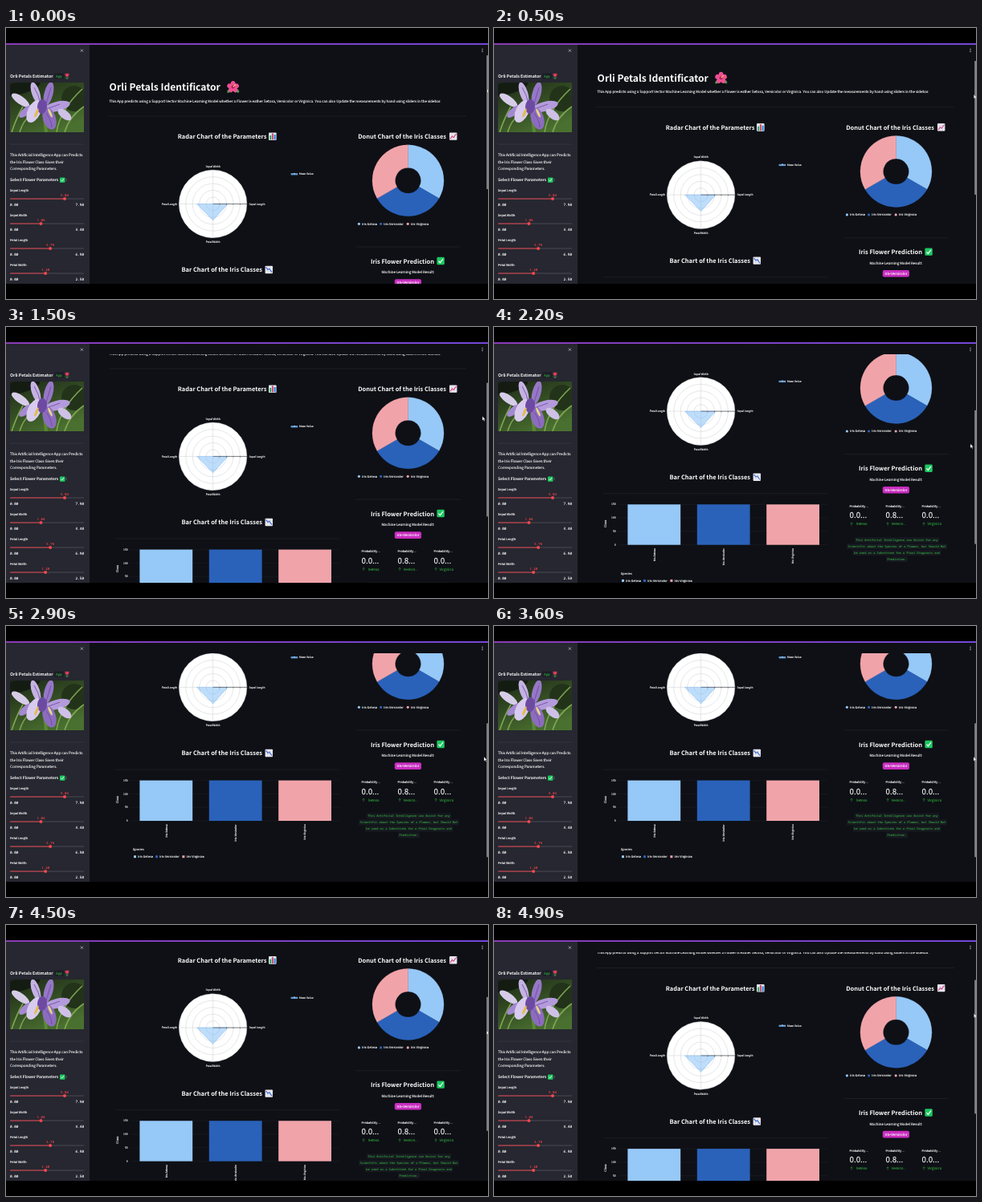
Recreate the animation shown at these times as an HTML page. Size 600x338 px, loop 5 s.

```html
<!DOCTYPE html>
<html lang="en">
<head>
<meta charset="utf-8">
<title>Flower dashboard</title>
<style>
@property --s { syntax: "<number>"; inherits: true; initial-value: 0; }
@property --cx { syntax: "<number>"; inherits: true; initial-value: 599; }
html, body { margin: 0; width: 100%; height: 100%; overflow: hidden; background: #000; }
svg { display: block; width: 600px; height: 338px; animation: scroll 5s infinite; }
text {
  font-family: "Noto Sans CJK JP", "Noto Sans CJK SC", "Noto Sans CJK", Lato, sans-serif;
  color: #fafafa; fill: currentColor; stroke: currentColor; stroke-width: .12;
  white-space: pre; text-rendering: geometricPrecision;
}
.b { font-weight: 700; stroke: none; }
.m { font-family: "Noto Sans Mono", "DejaVu Sans Mono", monospace; }
.red { color: #dc414a; }
.green { color: #2f9a3c; }
.mid { text-anchor: middle; }
.end { text-anchor: end; }
#page { transform: translateY(calc(var(--s) * -1px)); }
#thumb { transform: translateY(calc(var(--s) * .61px)); }
#cursor { transform: translate(calc(var(--cx) * 1px), calc(76px + var(--s) * .61px)); }

/* scroll position, advancing ten times a second */
@keyframes scroll {
  0%   { --s: 0;     --cx: 599; animation-timing-function: steps(3); }
  6%   { --s: 4;     --cx: 598; animation-timing-function: steps(3); }
  12%  { --s: 15;    --cx: 597; animation-timing-function: steps(4); }
  20%  { --s: 32.5;  --cx: 595; animation-timing-function: steps(5); }
  30%  { --s: 58;    --cx: 593; animation-timing-function: steps(7); }
  44%  { --s: 114.3; --cx: 593; animation-timing-function: steps(2); }
  48%  { --s: 126;   --cx: 594; animation-timing-function: steps(5); }
  58%  { --s: 143;   --cx: 595; animation-timing-function: steps(7); }
  72%  { --s: 143;   --cx: 597; animation-timing-function: steps(3); }
  78%  { --s: 134;   --cx: 598; animation-timing-function: steps(3); }
  84%  { --s: 117.5; --cx: 599; animation-timing-function: steps(7); }
  98%, 100% { --s: 56.5; --cx: 597.5; animation-timing-function: steps(1); }
}
</style>
</head>
<body>
<svg id="stage" viewBox="0 0 600 338" xmlns="http://www.w3.org/2000/svg"></svg>
<script>
const SKY = '#96c8f8', BLUE = '#2a62ba', PINK = '#f0a4aa', BG = '#0e1015';
const SPECIES = ['Setosa', 'Versicolor', 'Virginica'];
const COLORS = [SKY, BLUE, PINK];

const text = (x, y, size, str, cls = '', extra = '') =>
  `<text x="${x}" y="${y}" font-size="${size}" class="${cls}" ${extra}>${str}</text>`;
const rect = (x, y, w, h, fill, r = 0) =>
  `<rect x="${x}" y="${y}" width="${w}" height="${h}" fill="${fill}" rx="${r}"/>`;
const circle = (x, y, r, fill, extra = '') =>
  `<circle cx="${x}" cy="${y}" r="${r}" fill="${fill}" ${extra}/>`;
const path = (d, stroke, w = .4, fill = 'none') =>
  `<path d="${d}" stroke="${stroke}" stroke-width="${w}" fill="${fill}"/>`;
const ellipse = (x, y, rx, ry, turn, fill) =>
  `<ellipse rx="${rx}" ry="${ry}" fill="${fill}" transform="translate(${x} ${y}) rotate(${turn})"/>`;
const at = (x, y, body) => `<g transform="translate(${x} ${y})">${body}</g>`;
const each = (list, fn) => list.map(fn).join('');

// small icons
const check = (x, y, s) => at(x, y,
  rect(0, 0, s, s, '#1cc860', s * .14) +
  path(`M${s * .22} ${s * .52}L${s * .42} ${s * .74}L${s * .8} ${s * .24}`, '#fff', s * .13));
const trend = (x, y, line, d) => at(x, y,
  rect(0, 0, 9.4, 9.4, '#efeaf2', .8) +
  path('M3 .5V9M6.2 .5V9M.5 3H9M.5 6.2H9', '#b9c4dc', .35) + path(d, line, 1.1));
const bars = (x, y) => at(x, y,
  rect(0, 0, 9.6, 9.6, '#dfe8f2', .8) + rect(1.2, 3.6, 2, 5.4, '#2fa35b') +
  rect(3.9, 1, 2, 8, '#d9486a') + rect(6.6, 2.6, 2, 6.4, '#2a82d8'));
const blossom = at(282.6, 73.6,
  ellipse(-4.5, 4.6, 3.4, 1.8, -40, '#3f9b45') + ellipse(4.8, 4.4, 3.4, 1.8, 40, '#3f9b45') +
  each([0, 72, 144, 216, 288], a =>
    `<g transform="rotate(${a})">${ellipse(0, -4, 3, 3.6, 0, '#ee4f93')}</g>`) +
  circle(0, 0, 2, '#a81656') + path('M0 0L3 -3.2', '#f8d34c', 1.1));
const tulip = at(76, 60,
  path('M0 -1V4M0 3.6L-2 1.4M0 3.6L2 1.4', '#3f9b45', .8) +
  path('M-2.4 -3.6L-1.1 -2.6L0 -4L1.1 -2.6L2.4 -3.6Q2.8 .6 0 .8Q-2.8 .6 -2.4 -3.6Z', 'none', 0, '#e0405a'));

const photo = at(5, 68, `<g clip-path="url(#photoBox)">` +
  rect(0, 0, 92, 62, 'url(#leaf)') +
  ellipse(14, 6, 24, 8, -15, '#141c12') + ellipse(80, 20, 16, 16, 30, '#22331a') +
  path('M58 62Q62 34 90 8M68 62Q74 42 92 30M2 62Q8 44 16 30M12 62Q16 48 26 40', '#7fa552', 1.6) +
  path('M45 62L43 42', '#5a8a34', 4) +
  ellipse(13, 22, 13, 5, 35, '#d6cce8') + ellipse(20, 36, 11, 4.5, -40, '#a389cf') +
  ellipse(32, 13, 5, 14, -18, '#c4b2e2') + ellipse(48, 14, 5.5, 15, 14, '#9678c6') +
  ellipse(30, 36, 8, 15, 25, '#d8cbee') + ellipse(58, 30, 17, 6, -14, '#b49bdc') +
  ellipse(49, 45, 8, 14, -18, '#8c6cbe') + ellipse(68, 40, 10, 5, 38, '#cfc0e8') +
  ellipse(40, 30, 6, 9, 5, '#6d4aa2') +
  ellipse(33, 38, 1.6, 6, 22, '#e2bd4a') + ellipse(50, 38, 1.5, 6, -24, '#e6d68c') +
  path('M30 6Q36 16 38 26M51 6Q48 16 45 26M45 38Q52 48 52 56M62 27Q54 30 48 32', '#6b479f', .8) +
  '</g>');

// sidebar
const slider = ([name, value, max], i) => {
  const y = 213 + 31 * i, x = 5 + 92 * value / max;
  return text(5, y - 9.5, 3.85, name) +
    text(x, y - 3.4, 4.2, value.toFixed(2), 'm red mid') +
    rect(5, y - .5, 92, 1, '#4a4b55', .5) + rect(5, y - .6, x - 5, 1.2, '#dc414a', .5) +
    circle(x, y, 2, '#f0484f') +
    text(5, y + 9, 4.35, '0.00', 'm') + text(97, y + 9, 4.35, max.toFixed(2), 'm end');
};
const sidebar = rect(0, 20, 104, 299, '#262730') +
  path('M92.8 26.6L96 29.8M96 26.6L92.8 29.8', '#e8e8ec', .6) +
  text(5, 61.6, 5.3, 'Orli Petals Estimator', 'b') +
  rect(60.4, 56.6, 11.4, 7, '#1b1d26', 1) + text(62, 61.8, 4.4, 'App', 'm green') + tulip + photo +
  path('M5 145H97', '#464852', .4) +
  each(['This Artificial Intelligence App can Predicts', 'the Iris Flower Class Given their',
    'Corresponding Parameters.'], (s, i) => text(5, 160.2 + 8.6 * i, 4.6, s)) +
  text(5, 191.4, 4.8, 'Select Flower Parameters', 'b') + check(67, 186.4, 6.4) + text(74.2, 191.4, 4.8, ':', 'b') +
  each([['Sepal Length', 5.84, 7.9], ['Sepal Width', 1.84, 4.4],
    ['Petal Length', 3.76, 6.9], ['Petal Width', 1.2, 2.5]], slider);

// charts
const radar = at(257.6, 219.4,
  circle(0, 0, 42.4, '#fff') +
  each([1, 2, 3, 4, 5], k => circle(0, 0, 8.45 * k, 'none', 'stroke="#b4b6bd" stroke-width=".35"')) +
  path('M-42.4 0H42.4M0 -42.4V42.4', '#b4b6bd', .35) +
  path('M-20 0L0 20.5L18.5 0Z', '#83b9ee', .5, '#83c0f888') +
  path('M0 0H42.4' + each([1, 2, 3, 4, 5], k => `M${8.45 * k} 0v1.2`), '#3a3b42', .6) +
  text(0, -45.6, 3.3, 'Sepal Width', 'mid') + text(0, 48.8, 3.3, 'Petal Width', 'mid') +
  text(-44.6, 1.1, 3.3, 'Petal Length', 'end') + text(44.8, 1.1, 3.3, 'Sepal Length')) +
  rect(354.6, 181.6, 8.6, 1.8, '#5f9ad2') + path('M354.6 181.6H363.2', SKY, .6) + circle(359, 181.6, .9, SKY) +
  text(365, 183.2, 3.3, 'Mean Value');

const polar = (r, deg) => {
  const a = (deg - 90) * Math.PI / 180;
  return `${(r * Math.cos(a)).toFixed(2)} ${(r * Math.sin(a)).toFixed(2)}`;
};
const donut = at(500.5, 190.3, each(COLORS, (c, i) => {
  const a = 120 * i, b = a + 120;
  return path(`M${polar(44.5, a)}A44.5 44.5 0 0 1 ${polar(44.5, b)}L${polar(16, b)}A16 16 0 0 0 ${polar(16, a)}Z`,
    c, .3, c);
})) + each([439.4, 466.6, 500.2], (x, i) =>
  circle(x, 244.3, 1.6, COLORS[i]) + text(x + 3.7, 245.7, 3.85, 'Iris-' + SPECIES[i]));

const barChart = path('M136 322H415', '#262830', .5) +
  each([150, 100, 50, 0], (v, i) => {
    const y = 335.6 + 16.8 * i;
    return path(`M156 ${y}H415`, '#25272f', .4) + text(151.6, y + 1.1, 3.3, v, 'end');
  }) +
  text(0, 0, 3.85, 'Class', 'mid', 'transform="translate(140.4 359.6) rotate(-90)"') +
  each(COLORS, (c, i) => rect(166.4 + 86.4 * i, 335.6, 65.8, 50.4, c) +
    text(0, 0, 3.3, 'Iris-' + SPECIES[i], 'end', `transform="translate(${200.6 + 86.4 * i} 390.4) rotate(-90)"`)) +
  text(158, 423.4, 3.85, 'Species') +
  each([159, 186, 219.4], (x, i) => rect(x, 429.2, 3, 3, COLORS[i]) +
    text(x + 5.2, 432, 3.85, 'Iris-' + SPECIES[i]));

// prediction panel
const metrics = each([['0.0...', 'Setosa', 450.8], ['0.8...', 'Versico...', 494.8], ['0.0...', 'Virginica', 539.6]],
  ([value, delta, dx], i) => {
    const x = 442.5 + 45 * i;
    return text(x, 339.4, 3.85, 'Probability ...') + text(x, 352.8, 9.8, value) +
      path(`M${x + 2.6} 362v-3.8m-1.5 1.5l1.5 -1.5l1.5 1.5`, '#2f9a3c', .6) +
      text(dx, 361.7, 4.36, delta, 'green');
  });
const notes = each(['This Artificial Intelligence can Assist for any',
  'Scientific about the Species of a Flower, but Should Not',
  'be used as a Substitute for a Final Diagnosis and', 'Prediction.'], (s, i) => {
  const y = 380 + 8 * i, w = s.length * 2.18 + 3;
  return rect(501.5 - w / 2, y - 3.4, w, 6.8, '#171a20', 1) + text(501.5, y + 1.2, 3.63, s, 'm green mid');
});
const prediction = path('M436 273H565', '#2a2c34', .5) +
  text(454, 293.5, 7.5, 'Iris Flower Prediction', 'b') + check(536.4, 285.8, 9.4) +
  text(500.4, 306.3, 4.49, 'Machine Learning Model Result:', 'mid') +
  rect(483.8, 313.3, 33.2, 8.6, '#c92cc0', 2) + text(500.4, 319.2, 4.4, 'Iris-Versicolor', 'mid') +
  metrics + notes;

const page = text(128.6, 78.4, 12.1, 'Orli Petals Identificator', 'b') + blossom +
  text(128.6, 92.6, 4.49, 'This App predicts using a Support Vector Machine Learning Model whether a Flower is eather Setosa, ' +
    'Versicolor or Virginica. You can also Update the measurements by hand using sliders in the sidebar.') +
  path('M128 110H573', '#2a2c34', .5) +
  text(213.8, 138.2, 7.45, 'Radar Chart of the Parameters', 'b') + bars(327, 130.4) + radar +
  text(438.3, 138.2, 7.45, 'Donut Chart of the Iris Classes', 'b') +
  trend(552, 130.4, '#d8468c', 'M.8 8L3.4 4.6L5.2 6L8.6 1.4') + donut +
  text(218.4, 304.4, 7.5, 'Bar Chart of the Iris Classes', 'b') +
  trend(322.6, 296.8, '#3a6fd0', 'M.8 1.4L3.4 4.6L5.2 3.4L8.6 8') + barChart + prediction;

document.getElementById('stage').innerHTML = `<defs>
  <clipPath id="view"><rect x="104" y="34" width="496" height="285"/></clipPath>
  <clipPath id="photoBox"><rect width="92" height="62"/></clipPath>
  <linearGradient id="leaf" x2=".6" y2="1"><stop stop-color="#1c2716"/><stop offset="1" stop-color="#4a7030"/></linearGradient>
  <linearGradient id="strip"><stop stop-color="#8a3cb4"/><stop offset="1" stop-color="#7448d8"/></linearGradient>
</defs>` +
  rect(0, 0, 600, 338, '#000') + rect(104, 20, 496, 299, BG) +
  `<g clip-path="url(#view)"><g id="page">${page}</g></g>` + sidebar +
  rect(0, 19, 600, 2, 'url(#strip)') +
  each([26, 27.8, 29.6], y => circle(593, y, .6, '#e8e8ec')) +
  `<g id="thumb">${rect(598.2, 34, 1.8, 167, '#85868d', .6)}</g>` +
  `<g id="cursor">${path('M0 0V5.2L1.3 4.1L2.2 6L3 5.6L2.1 3.8H3.7Z', '#222', .25, '#fff')}</g>`;
</script>
</body>
</html>
```
